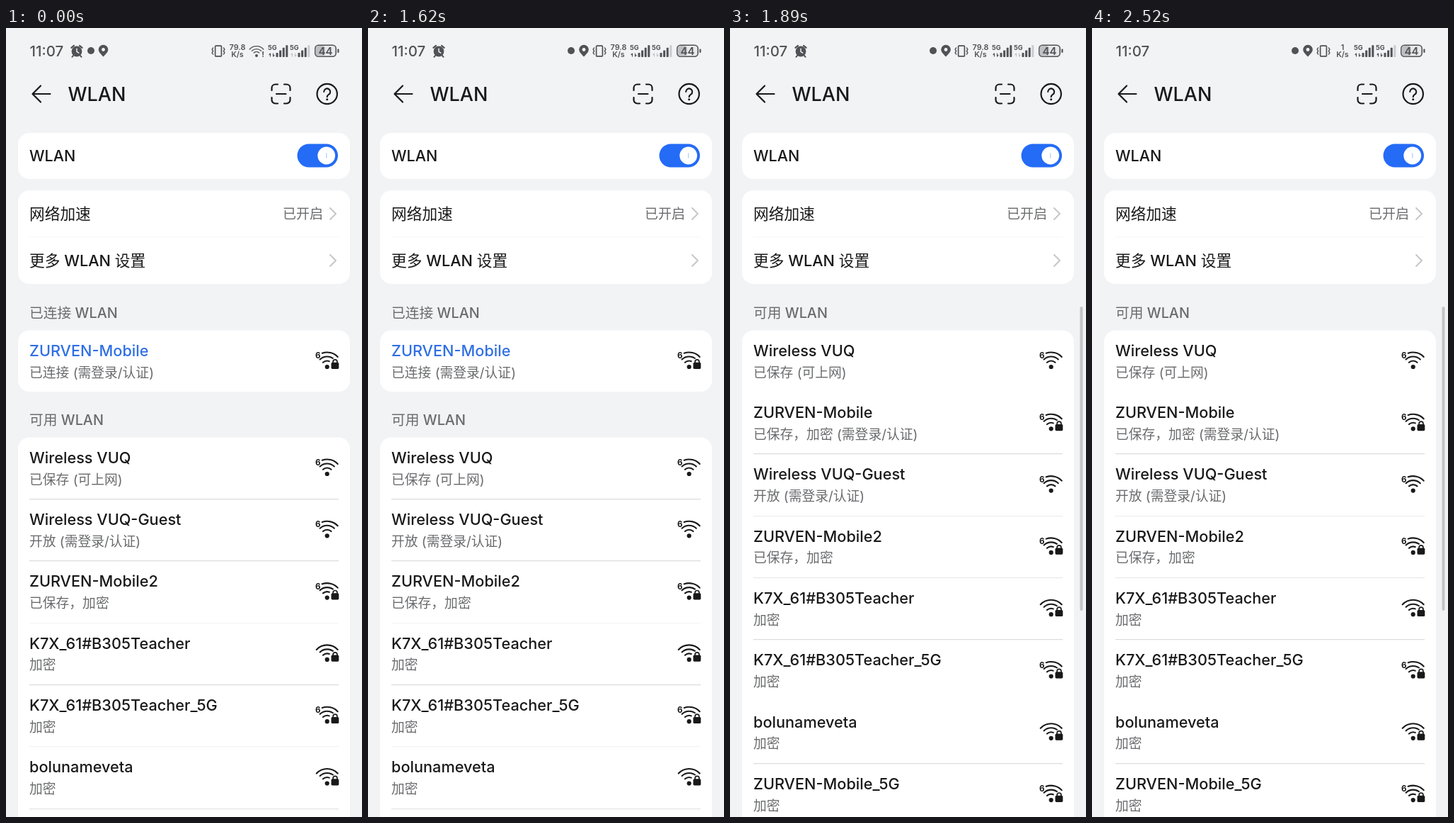
Recreate the animation shown at these times as an HTML page. Size 503 by 1113 pixels, loop 2.7 s.

```html
<!DOCTYPE html>
<html lang="zh-CN">
<head>
<meta charset="utf-8">
<style>
  html, body { margin: 0; width: 100%; height: 100%; overflow: hidden; background: #f1f3f5; }
  svg { display: block; font-family: Inter, "Noto Sans CJK SC", "Noto Sans CJK", sans-serif; }
</style>
</head>
<body>
<svg id="stage" width="503" height="1113" viewBox="0 0 503 1113"></svg>
<script>
const INK = '#19191a', GRAY = '#6a6b6d', BAR = '#505256', BLUE = '#246bf6';
const LOOP = 2700;

const text = (x, y, size, str, fill = INK, weight = 500, extra = '') =>
  `<text x="${x}" y="${y}" font-size="${size}" fill="${fill}" font-weight="${weight}" ${extra}>${str}</text>`;
const mid = (x, y, size, str, fill = BAR, weight = 700) =>
  text(x, y, size, str, fill, weight, 'text-anchor="middle"');
const rect = (x, y, w, h, fill, r = 0) =>
  `<rect x="${x}" y="${y}" width="${w}" height="${h}" rx="${r}" fill="${fill}"/>`;
const circle = (x, y, r, fill) => `<circle cx="${x}" cy="${y}" r="${r}" fill="${fill}"/>`;
const line = (d, width, color = INK) =>
  `<path d="${d}" fill="none" stroke="${color}" stroke-width="${width}" stroke-linecap="round" stroke-linejoin="round"/>`;
const at = (x, y, body, scale = 1) => `<g transform="translate(${x} ${y}) scale(${scale})">${body}</g>`;
const card = (y, h) => rect(17, y, 469, h, '#fff', 16);
const rule = (y, alpha) => `<rect x="33" y="${y}" width="437" height="1.2" fill="#000" opacity="${alpha}"/>`;
const chevron = y => line(`M458 ${y - 8}l8 8l-8 8`, 1.8, '#c3c5c8');

// Arc around the origin, angles in degrees from straight up
function arc(r, from, to, width, color) {
  const p = a => `${r * Math.sin(a * Math.PI / 180)} ${-r * Math.cos(a * Math.PI / 180)}`;
  return line(`M${p(from)}A${r} ${r} 0 0 1 ${p(to)}`, width, color);
}

function wifi(color = INK, six = false) {
  return arc(20.5, six ? -20 : -47, 47, 2.1, color) + arc(14.5, -44, 44, 2.1, color) +
    arc(8.5, -43, 43, 2.1, color) + circle(0, 0, 3.1, color) +
    (six ? mid(-13, -12, 11.5, '6', color) : '');
}

const lock = rect(3.6, -9.4, 15, 14, '#fff', 3) +
  line('M8.3 -5v-2.4a3 3 0 0 1 6 0v2.4', 3.6, '#fff') +
  line('M8.4 -5v-2.2a2.9 2.9 0 0 1 5.8 0v2.2', 1.7) + rect(5.8, -6.3, 10.8, 9.2, INK, 1.7);

// Status bar icons
const alarm = x => at(x, 32.5, circle(0, 0.5, 7.4, BAR) + line('M-7.6 -4.6l3.6 -3M7.6 -4.6l-3.6 -3', 2.2, BAR) +
  line('M-5 6.5l-1.6 1.8M5 6.5l1.6 1.8', 1.9, BAR) + line('M0 -3.2v4l2.8 1.8', 1.5, '#f1f3f5'));
const dot = x => circle(x, 32, 5, BAR);
const pin = x => at(x, 32, `<path d="M0 8.6C-2.6 5.6 -6.8 2.2 -6.8 -1.5a6.8 6.8 0 0 1 13.6 0C6.8 2.2 2.6 5.6 0 8.6z" fill="${BAR}"/>` +
  circle(0, -1.5, 2.4, '#f1f3f5'));
const buzz = x => at(x, 32.5, line('M-3.4 -7.4h6.8a1 1 0 0 1 1 1v12.8a1 1 0 0 1 -1 1h-6.8a1 1 0 0 1 -1 -1v-12.8a1 1 0 0 1 1 -1z', 1.7, BAR) +
  line('M-7.4 -4.6l-1.5 2.3l1.5 2.3l-1.5 2.3l1.5 2.3M7.4 -4.6l1.5 2.3l-1.5 2.3l1.5 2.3l-1.5 2.3', 1.4, BAR));
const speed = (x, n) => mid(x, 31.2, 10.8, n, BAR, 600) + mid(x, 41, 10.8, 'K/s', BAR, 600);
const weakWifi = x => at(x, 39, wifi(BAR), 0.65) + mid(x + 9, 41, 11, '!');

function signal(x, full, arrows) {
  let out = text(x - 1, 31, 9.2, '5G', BAR, 700);
  for (let i = 0; i < 4; i++) {
    const h = 6 + i * 3.6;
    out += rect(x + 10.5 + i * 4.6, 41 - h, 3, h, i < full ? BAR : '#c9cbce', 0.8);
  }
  return out + line(`M${x + 2.5} 40v-4l-1.5 1.5M${x + 6.5} 36v4l1.5 -1.5`, 1.2, arrows);
}

const battery = rect(436, 23.5, 31, 17.5, BAR, 5.5) + rect(437.6, 25.1, 27.8, 14.3, '#e7e9eb', 4) +
  rect(437.6, 25.1, 13, 14.3, '#bdbfc2', 4) + rect(468.3, 29.5, 2.2, 5.5, BAR, 1) + mid(451.4, 37.8, 15, '44', BAR, 600);

function status(t) {
  let icons;
  if (t < 1620) icons = alarm(100) + dot(120) + pin(137.5) + buzz(300) + speed(327, '79.8') + weakWifi(354);
  else {
    icons = buzz(327) + speed(354, t < 2070 ? '79.8' : '1');
    if (t < 2250) icons += alarm(100);
    if (t < 2070 || t >= 2520) icons += dot(287) + pin(305);
    else icons += dot(306);
    if (t >= 2250 && t < 2520) icons += alarm(287);
  }
  return text(33.5, 39.5, 20.5, '11:07', BAR) + icons + signal(371, 4, BAR) +
    signal(402, 3, t < 2070 ? '#c0c2c5' : BAR) + battery;
}

const header = line('M38 93h24.5M49 81.5l-11.5 11.5l11.5 11.5', 2.2) + text(87.5, 102.5, 27, 'WLAN') +
  line('M375.5 88v-3.5a5 5 0 0 1 5 -5h3.5M393 79.5h3.5a5 5 0 0 1 5 5v3.5M401.5 98v3.5a5 5 0 0 1 -5 5h-3.5M384 106.5h-3.5a5 5 0 0 1 -5 -5v-3.5M382 93h13.5', 2.2) +
  `<circle cx="453.7" cy="93" r="14.2" fill="none" stroke="${INK}" stroke-width="2.2"/>` +
  line('M449.2 90a4.5 4.5 0 1 1 7 3.7c-1.7 1.1 -2.5 1.7 -2.5 3.5', 2.1) + circle(453.7, 100.8, 1.5, INK);

const settings = card(148, 65) + text(33, 188, 21.5, 'WLAN') +
  rect(411.5, 163.5, 57.5, 33, BLUE, 16.5) + circle(452.7, 180, 12.4, '#fff') + line('M452.7 177v6', 1.4, '#b9d0fb') +
  card(229, 132) + text(33, 270, 21.7, '网络加速') +
  text(448, 269, 19, '已开启', GRAY, 400, 'text-anchor="end"') + chevron(262) +
  rule(294.5, 0.03) + text(33, 336, 21.7, '更多 WLAN 设置') + chevron(328);

const SAVED = '已保存，加密', LOCKED = '加密', OPEN = '开放 (需登录/认证)';
// name, note, wifi 6, locked
const home = ['Wireless VUQ', '已保存 (可上网)', 1, 0];
const mobile = ['ZURVEN-Mobile', '已连接 (需登录/认证)', 1, 1];
const others = [
  ['Wireless VUQ-Guest', OPEN, 1, 0],
  ['ZURVEN-Mobile2', SAVED, 1, 1],
  ['K7X_61#B305Teacher', LOCKED, 0, 1],
  ['K7X_61#B305Teacher_5G', LOCKED, 1, 1],
  ['bolunameveta', LOCKED, 0, 1],
  ['ZURVEN-Mobile_5G', LOCKED, 1, 1]
];

const row = ([name, note, six, locked], y, color) =>
  text(33, y + 36.3, 21.7, name, color) + text(33, y + 66, 18.8, note, GRAY, 400) +
  at(453.7, y + 51.5, wifi(INK, six) + (locked ? lock : ''));
const label = (y, str) => text(33, y, 19.8, str, GRAY);

function list(top, rows, rules) {
  return label(top - 17.3, '可用 WLAN') + card(top, 700) + rows.map((r, i) =>
    row(r, top + i * 87.3) + (rules[i] ? rule(Math.round(top + (i + 1) * 87.3 - 0.8), rules[i]) : '')).join('');
}

function draw(t) {
  const body = t < 1800
    ? label(409.2, '已连接 WLAN') + card(426.5, 86.5) + row(mobile, 426.5, '#2f6fe4') +
      list(577.5, [home, ...others.slice(0, 5)], [0.14, 0.14, 0.04, 0.15, 0.05, 0.11])
    : list(426.5, [home, [mobile[0], '已保存，加密 (需登录/认证)', 1, 1], ...others], [0, 0.14, 0.07, 0.09, 0.14, 0, 0.14]);
  const scrollbar = t >= 1890 ? rect(494.5, 393, 4, 429, '#c2c4c6', 2) : '';
  return status(t) + header + settings + body + scrollbar;
}

const stage = document.getElementById('stage');
const steps = [0, 1620, 1800, 1890, 2070, 2250, 2520];
let shown = -1;
function tick() {
  const t = performance.now() % LOOP;
  const step = steps.filter(s => s <= t).pop();
  if (step !== shown) stage.innerHTML = draw(shown = step);
  requestAnimationFrame(tick);
}
tick();
</script>
</body>
</html>
```
